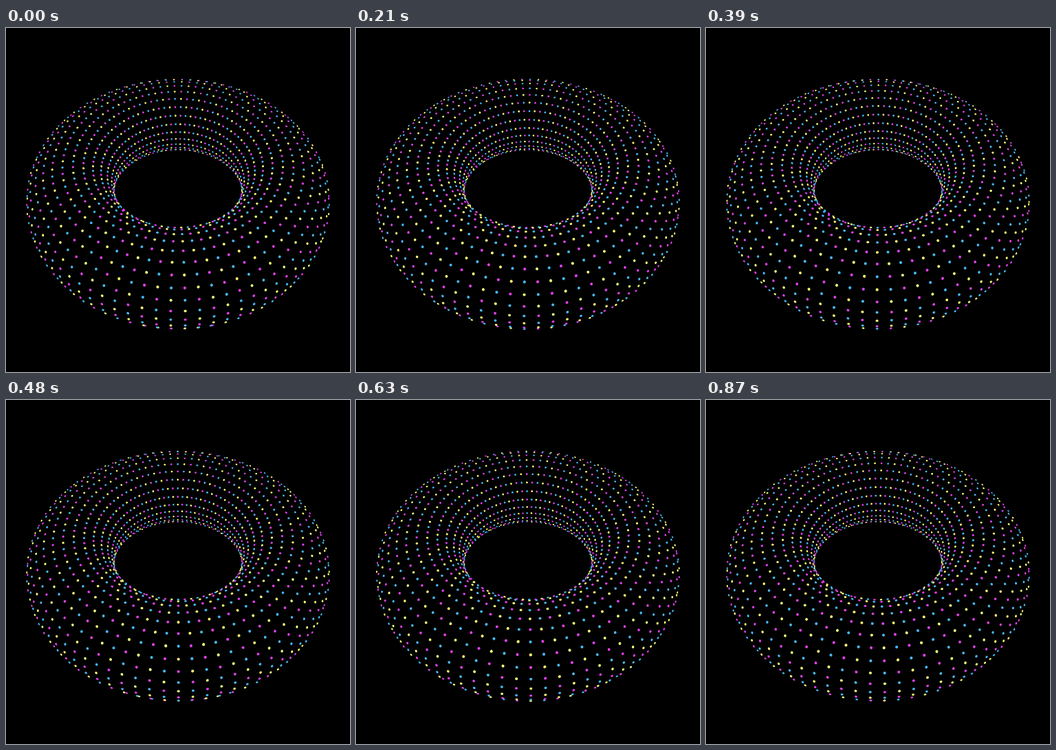
Animation, 500 px wide and 500 px high, one loop 0.9 s. Source, as an HTML page with a canvas:

```html
<!DOCTYPE html>
<html lang="en">
<head>
<meta charset="utf-8">
<title>Dotted torus</title>
<style>
  html, body { margin: 0; width: 100%; height: 100%; overflow: hidden; background: #000; }
  canvas { display: block; width: 500px; height: 500px; }
</style>
</head>
<body>
<canvas id="stage" width="500" height="500"></canvas>
<script>
const ctx = document.getElementById('stage').getContext('2d');
const TAU = Math.PI * 2;
const LOOP = 900, STEP = 30;
const COLUMNS = 84, RINGS = 28;
const COLORS = ['#45b8f0', '#e040ea', '#fbfb78'];

// Lengths are in units of the tube radius.
const MAJOR = 2.583, DISTANCE = 8.945, OFFSET_Y = -0.4585;
const FOCAL = 524, DOT = 0.0255;
const HORIZON = -0.12; // dots stick out a little past the rim
const TILT = 51.5 * Math.PI / 180;
const RING_START = -63.34 * Math.PI / 180; // underside, out of sight
const SIN = Math.sin(TILT), COS = Math.cos(TILT);

function drawDot(phi, psi, color) {
  const out = Math.cos(psi), up = Math.sin(psi);
  const side = Math.sin(phi), front = Math.cos(phi);
  const reach = MAJOR + out;

  const x = reach * side;
  const y = reach * front * SIN - up * COS + OFFSET_Y;
  const depth = DISTANCE - reach * front * COS - up * SIN;

  const nx = out * side;
  const ny = out * front * SIN - up * COS;
  const nz = out * front * COS + up * SIN;
  const len = Math.hypot(x, y, depth);
  const facing = (nz * depth - nx * x - ny * y) / len;
  if (facing < HORIZON) return;

  // Dots flatten along the surface normal near the rim.
  const angle = Math.atan2(ny + facing * y / len, nx + facing * x / len);
  const scale = FOCAL / depth;
  const radius = DOT * scale;
  ctx.fillStyle = color;
  ctx.beginPath();
  ctx.ellipse(250 + x * scale, 250 + y * scale,
    radius * (0.65 + 0.35 * facing), radius, angle, 0, TAU);
  ctx.fill();
}

function draw(time) {
  const p = Math.floor((time % LOOP) / STEP) * STEP / LOOP;
  ctx.fillStyle = '#000';
  ctx.fillRect(0, 0, 500, 500);
  // Each loop moves the lattice one column around and two rings over the tube.
  for (let j = 0; j < RINGS; j++) {
    const psi = RING_START + (j + 2 * p) * TAU / RINGS;
    for (let i = 0; i < COLUMNS; i++) {
      drawDot((i - 0.5 + p) * TAU / COLUMNS, psi, COLORS[(i + j) % 3]);
    }
  }
}

const start = performance.now();
function tick() {
  draw(performance.now() - start);
  requestAnimationFrame(tick);
}
tick();
</script>
</body>
</html>
```
